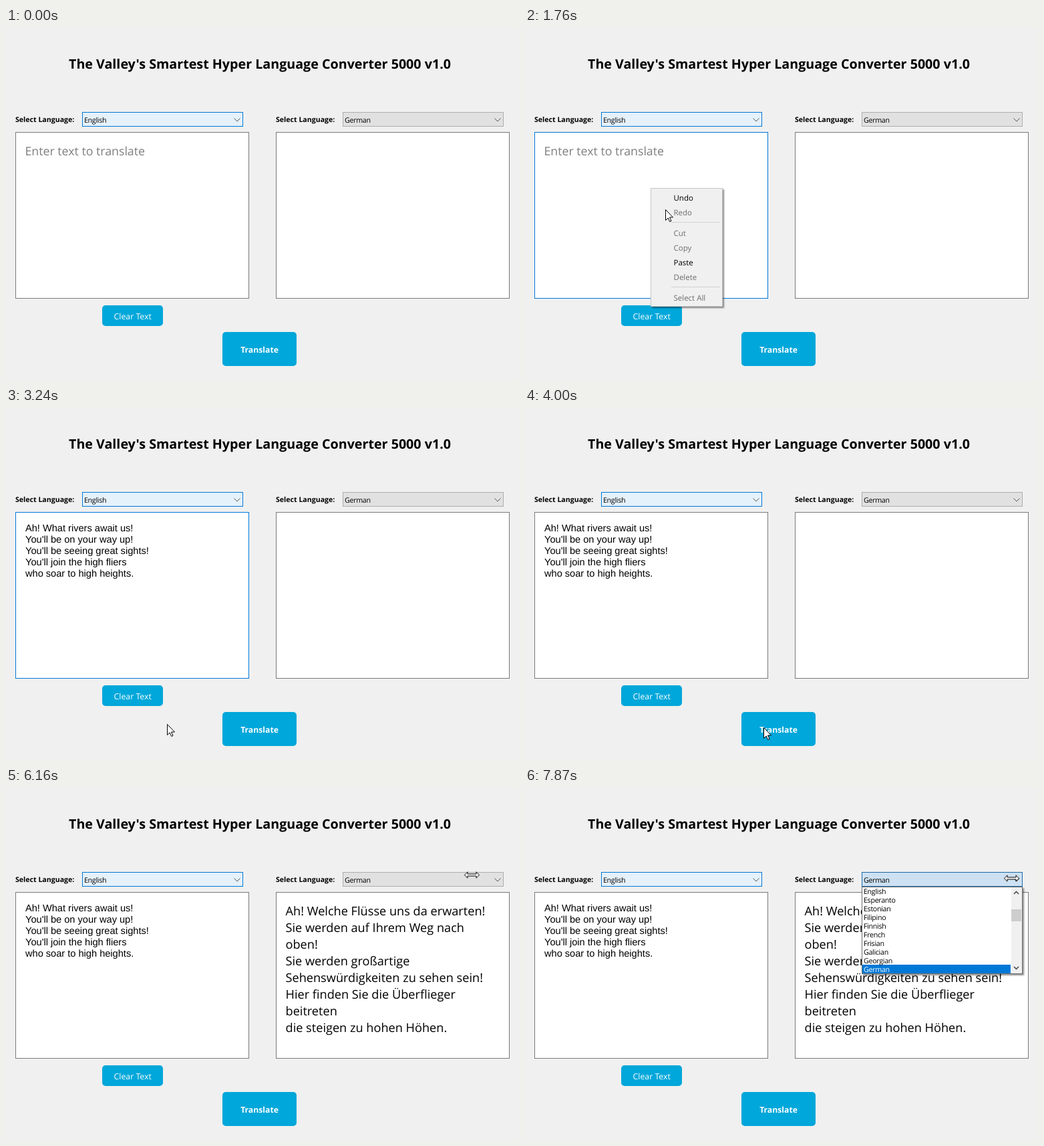
An HTML page that plays this animation: 768x528 px, repeating every 8 s.

```html
<!DOCTYPE html>
<html lang="en">
<head>
<meta charset="utf-8">
<title>Translator window</title>
<style>
html, body { margin: 0; width: 100%; height: 100%; overflow: hidden; background: #f0f0f0; }
svg { display: block; width: 768px; height: 528px; font-family: "Open Sans", "Noto Sans", sans-serif; text-rendering: geometricPrecision; }

.title { font-size: 19.7px; font-weight: 700; text-anchor: middle; }
.label { font-size: 10.6px; font-weight: 700; }
.small { font-size: 10.7px; letter-spacing: -.32px; }
.hint { font-size: 17.75px; fill: #7f7f7f; }
.verse { font-family: "Liberation Sans", Arial, sans-serif; font-size: 14.6px; }
.result { font-size: 18.17px; }
.item { font-size: 11.5px; }
.off { fill: #6d6d6d; }
.button rect { fill: #00a7da; }
.button text { fill: #fff; text-anchor: middle; }
.box { fill: #fff; stroke: #7a7a7a; }
.chevron { fill: none; stroke: #555; }
.pointer { fill: #fff; stroke: #000; }
.pop { filter: drop-shadow(2px 2px 1px rgba(0, 0, 0, .45)); }

/* every part shares one 8 s clock */
.anim { animation: 8s step-end -8ms infinite; }
.focus { animation-name: focus; }
.hint { animation-name: hint; }
.verse { animation-name: verse; }
.caret { animation-name: caret; }
.menu { animation-name: menu; }
.hover { animation-name: hover; }
.result { animation-name: result; }
.press { animation-name: press; }
.list { animation-name: list; }
.arrow { animation-name: arrow; }
.resize { animation-name: resize; }

@keyframes focus { 0%, 49% { stroke: #7a7a7a; } 18.2% { stroke: #0078d7; } }
@keyframes hint { 0% { opacity: 1; } 32.75%, 100% { opacity: 0; } }
@keyframes verse { 0% { opacity: 0; } 32.75%, 100% { opacity: 1; } }
@keyframes caret { 0%, 39.4%, 49% { opacity: 0; } 32.75%, 46.1% { opacity: 1; } }
@keyframes menu { 0%, 33.6%, 100% { opacity: 0; } 19.1%, 32.75% { opacity: .5; } 20.1% { opacity: 1; } }
@keyframes hover { 0% { opacity: 0; } 26.75%, 100% { opacity: 1; } }
@keyframes result { 0% { opacity: 0; } 52.85%, 100% { opacity: 1; } }
@keyframes press {
  0% { fill: #e1e1e1; stroke: #adadad; }
  92.5% { fill: #e1e1e1; stroke: #adadad; animation-timing-function: steps(5); }
  98.37%, 100% { fill: #cde1f2; stroke: #1f68a5; }
}
@keyframes list {
  0% { transform: translateY(-140px); }
  93.5% { transform: translateY(-98px); animation-timing-function: steps(3); }
  96.5%, 100% { transform: none; }
}
@keyframes arrow {
  0% { transform: translate(-40px, 448px); }
  5.5% { transform: translate(55px, 448px); animation-timing-function: steps(3); }
  8.44% { transform: translate(150px, 320px); animation-timing-function: steps(5); }
  13.37% { transform: translate(188px, 261px); }
  15.25% { transform: translate(187px, 248px); }
  16.25% { transform: translate(186px, 240px); }
  18.2% { transform: translate(188px, 240px); }
  19.1% { transform: translate(188px, 240px); animation-timing-function: steps(6); }
  24.87% { transform: translate(232px, 304px); }
  25.87% { transform: translate(234px, 324px); }
  26.75% { transform: translate(235px, 343px); }
  27.75% { transform: translate(236px, 355px); animation-timing-function: steps(3); }
  30.62% { transform: translate(236px, 358px); }
  34.75% { transform: translate(236px, 358px); animation-timing-function: steps(6); }
  40.5% { transform: translate(241px, 474px); }
  41.37% { transform: translate(275px, 486px); }
  42.3% { transform: translate(330px, 483px); }
  43.25% { transform: translate(357px, 479px); }
  52.87% { transform: translate(362px, 493px); animation-timing-function: steps(5); }
  57.75% { transform: translate(719px, 250px); }
  58.6%, 100% { transform: translate(-40px, 250px); }
}
@keyframes resize {
  0% { transform: translate(800px, 159px); }
  62.62% { transform: translate(765px, 159px); animation-timing-function: steps(4); }
  66.5% { transform: translate(744.5px, 144.5px); }
  67.4% { transform: translate(744.5px, 144.5px); animation-timing-function: steps(4); }
  71.25% { transform: translate(732.5px, 137.5px); }
  73.12% { transform: translate(731.5px, 138.5px); }
  74.12% { transform: translate(730.5px, 138.5px); }
  77% { transform: translate(697.5px, 130.5px); }
  78% { transform: translate(693.5px, 132.5px); }
  78.9% { transform: translate(693.5px, 132.5px); animation-timing-function: steps(3); }
  81.87%, 100% { transform: translate(728.5px, 135.5px); }
}
</style>
</head>
<body>
<svg viewBox="0 0 768 528">
  <defs>
    <clipPath id="below"><rect x="500" y="148" width="260" height="150"/></clipPath>
    <path id="down" class="chevron" d="M-4.5 -2.5L0 2 4.5 -2.5"/>
  </defs>
  <rect width="768" height="528" fill="#f0f0f0"/>
  <text class="title" x="380" y="61">The Valley's Smartest Hyper Language Converter 5000 v1.0</text>

  <text class="label" x="14" y="141">Select Language:</text>
  <rect x="114.500" y="126.500" width="240" height="21" fill="#e5f1fb" stroke="#0078d7"/>
  <text class="small" x="117" y="142">English</text>
  <use href="#down" x="346" y="138"/>

  <text class="label" x="404" y="141">Select Language:</text>
  <rect class="anim press" x="504.500" y="126.500" width="240" height="21"/>
  <text class="small" x="507" y="142">German</text>
  <use href="#down" x="736" y="138"/>

  <rect class="box anim focus" x="14.500" y="156.500" width="349" height="249"/>
  <text class="hint anim" x="28.500" y="191">Enter text to translate</text>
  <text class="verse anim" y="185">
    <tspan x="29">Ah! What rivers await us!</tspan>
    <tspan x="29" dy="17">You'll be on your way up!</tspan>
    <tspan x="29" dy="17">You'll be seeing great sights!</tspan>
    <tspan x="29" dy="17">You'll join the high fliers</tspan>
    <tspan x="29" dy="17">who soar to high heights.</tspan>
  </text>
  <rect class="caret anim" x="191" y="239" width="1" height="17"/>

  <rect class="box" x="404.500" y="156.500" width="349" height="249"/>
  <text class="result anim" y="191">
    <tspan x="418.500">Ah! Welche Flüsse uns da erwarten!</tspan>
    <tspan x="418.500" dy="25">Sie werden auf Ihrem Weg nach</tspan>
    <tspan x="418.500" dy="25">oben!</tspan>
    <tspan x="418.500" dy="25">Sie werden großartige</tspan>
    <tspan x="418.500" dy="25">Sehenswürdigkeiten zu sehen sein!</tspan>
    <tspan x="418.500" dy="25">Hier finden Sie die Überflieger</tspan>
    <tspan x="418.500" dy="25">beitreten</tspan>
    <tspan x="418.500" dy="25">die steigen zu hohen Höhen.</tspan>
  </text>

  <g class="button">
    <rect x="144" y="416" width="91" height="31" rx="5"/>
    <text x="189.700" y="437" font-size="12.3">Clear Text</text>
    <rect x="324" y="456" width="111" height="51" rx="5"/>
    <text x="379.500" y="487" font-size="12.2" font-weight="700">Translate</text>
  </g>

  <g class="menu anim">
    <rect class="pop" x="188.500" y="240.500" width="107" height="177" fill="#f0f0f0" stroke="#c4c4c4"/>
    <rect class="hover anim" x="191" y="340" width="101" height="22" fill="#91c9f7"/>
    <path d="M219 291.500H292M219 388.500H292" stroke="#d2d2d2"/>
    <g class="item">
      <text x="222.500" y="259">Undo</text>
      <text x="222.500" y="281" class="off">Redo</text>
      <text x="222.500" y="312" class="off">Cut</text>
      <text x="222.500" y="334" class="off">Copy</text>
      <text x="222.500" y="356">Paste</text>
      <text x="222.500" y="378" class="off">Delete</text>
      <text x="222.500" y="409" class="off">Select All</text>
    </g>
  </g>

  <g clip-path="url(#below)">
    <g class="list anim">
      <rect class="pop" x="504.500" y="148.500" width="240" height="130" fill="#fff" stroke="#707070"/>
      <rect x="505" y="265" width="222" height="13" fill="#0078d7"/>
      <rect x="728" y="149" width="16" height="129" fill="#f0f0f0"/>
      <rect x="728" y="182" width="15" height="18" fill="#cdcdcd"/>
      <path d="M732 159l3.500-3.500 3.500 3.500M732 268l3.500 3.500 3.500-3.500" fill="none" stroke="#505050" stroke-width="1.700"/>
      <text class="small" y="159">
        <tspan x="507">English</tspan>
        <tspan x="507" dy="13">Esperanto</tspan>
        <tspan x="507" dy="13">Estonian</tspan>
        <tspan x="507" dy="13">Filipino</tspan>
        <tspan x="507" dy="13">Finnish</tspan>
        <tspan x="507" dy="13">French</tspan>
        <tspan x="507" dy="13">Frisian</tspan>
        <tspan x="507" dy="13">Galician</tspan>
        <tspan x="507" dy="13">Georgian</tspan>
        <tspan x="507" dy="13" fill="#fff">German</tspan>
      </text>
    </g>
  </g>

  <path class="pointer arrow anim" d="M.5 .5V16.500L4.200 13 6.700 18.500 9 17.500 6.500 12H11.500Z"/>
  <path class="pointer resize anim" d="M-11 0L-6.500 -4.500V-1.500H6.500V-4.500L11 0 6.500 4.500V1.500H-6.500V4.500Z"/>
</svg>
</body>
</html>
```
